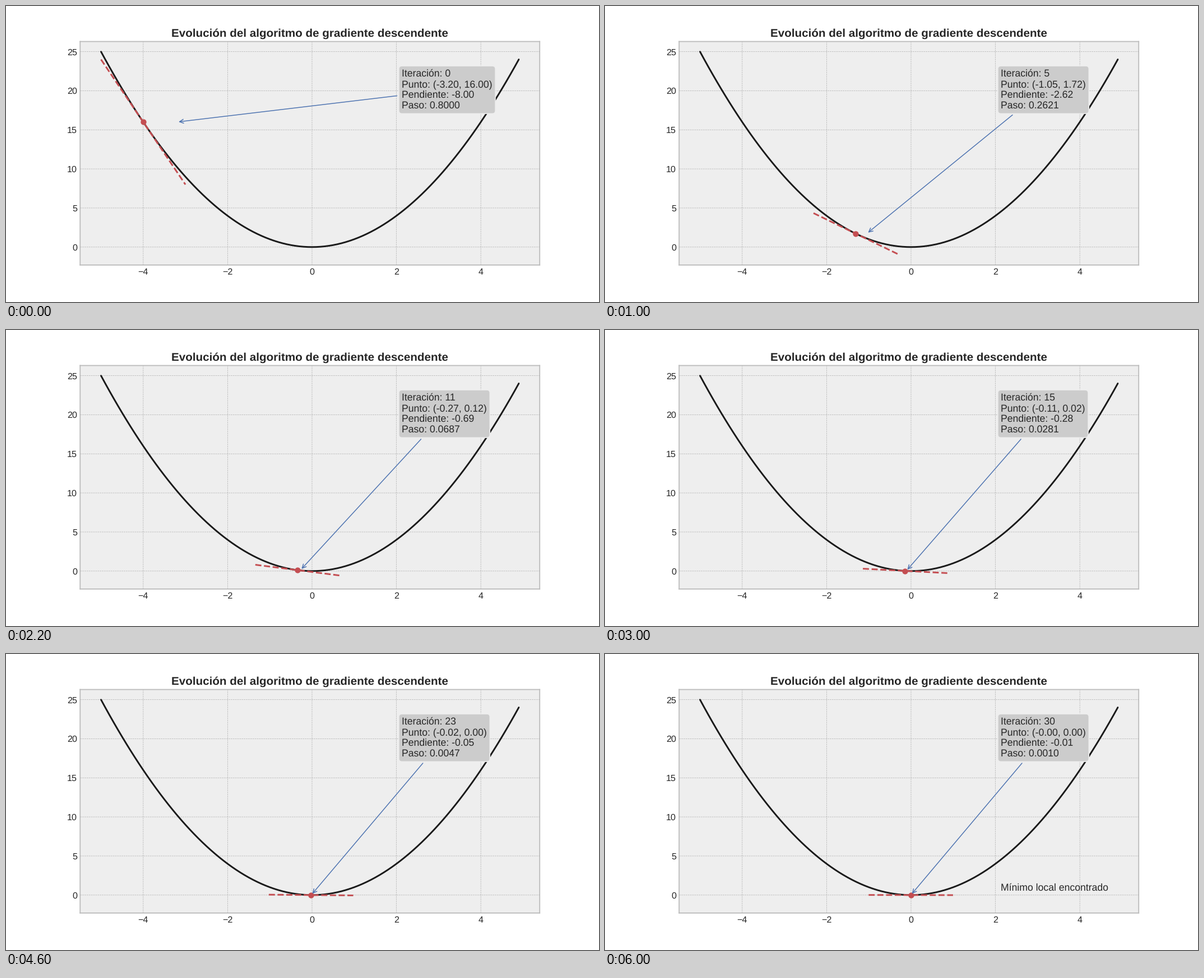
Recreate the animation shown at these times as a matplotlib script. Size 1058 by 529 pixels, loop 6.2 s.

```python
import numpy as np
import matplotlib.pyplot as plt
from matplotlib.animation import FuncAnimation

STEPS, INTERVAL = 31, 200
RATE, START, TOL = 0.1, -4.0, 1e-3

INK, BLACK, RED, BLUE = "0.15", "0.1", "#C44E52", "#4C72B0"
PANEL, EDGE, GRID = "#eeeeee", "#bcbcbc", "#b2b2b2"

plt.rcParams.update({
    "font.family": "Liberation Sans",
    "font.size": 12,
    "text.color": INK,
    "text.hinting": "none",
    "path.snap": False,
})


def f(x):
    return x ** 2


def slope(x):
    return 2 * x


fig = plt.figure(figsize=(10, 5), dpi=105.8, facecolor="white")
ax = fig.add_axes([0.125, 0.125, 0.775, 0.755], facecolor=PANEL)
ax.set_axisbelow(True)
ax.grid(True, color=GRID, linestyle="--", linewidth=0.5)
ax.tick_params(length=0, pad=3.5, labelsize=11, labelcolor=INK)
for spine in ax.spines.values():
    spine.set(color=EDGE, linewidth=1.25)
ax.set_title("Evolución del algoritmo de gradiente descendente",
             fontsize=14, fontweight="bold", color=INK, pad=6)

xs = np.arange(-5, 5, 0.1)
ax.plot(xs, f(xs), color=BLACK, lw=2, solid_capstyle="round")
tangent, = ax.plot([], [], "--", color=RED, lw=2)
dot, = ax.plot([], [], "o", color=RED, ms=6, mew=1)
ax.set_xlim(-5.495, 5.395)
ax.set_ylim(-2.2975, 26.2999)
ax.set_xticks(range(-4, 5, 2))
ax.set_yticks(range(0, 26, 5))

note = ax.annotate(
    "", xy=(START, f(START)), xytext=(0.7, 0.7), textcoords="axes fraction",
    linespacing=1.19,
    bbox=dict(boxstyle="round", fc="0.8", ec=PANEL, lw=1),
    arrowprops=dict(arrowstyle="->", color=BLUE, lw=1))
found = ax.text(0.7, 0.1, "Mínimo local encontrado", transform=ax.transAxes)


def draw(i):
    x = START * (1 - 2 * RATE) ** i
    y, m = f(x), slope(x)
    step = abs(RATE * m)
    x_next = x - RATE * m

    dot.set_data([x], [y])
    tangent.set_data([x - 1, x + 1], [y - m, y + m])
    note.xy = (x_next, y)
    note.set_text(f"Iteración: {i}\n"
                  f"Punto: ({x_next:.2f}, {y:.2f})\n"
                  f"Pendiente: {m:.2f}\n"
                  f"Paso: {step:.4f}")
    found.set_visible(step < TOL)
    return tangent, dot, note, found


anim = FuncAnimation(fig, draw, frames=STEPS, init_func=lambda: draw(0),
                     interval=INTERVAL, repeat=True, repeat_delay=0)
plt.show()
```
